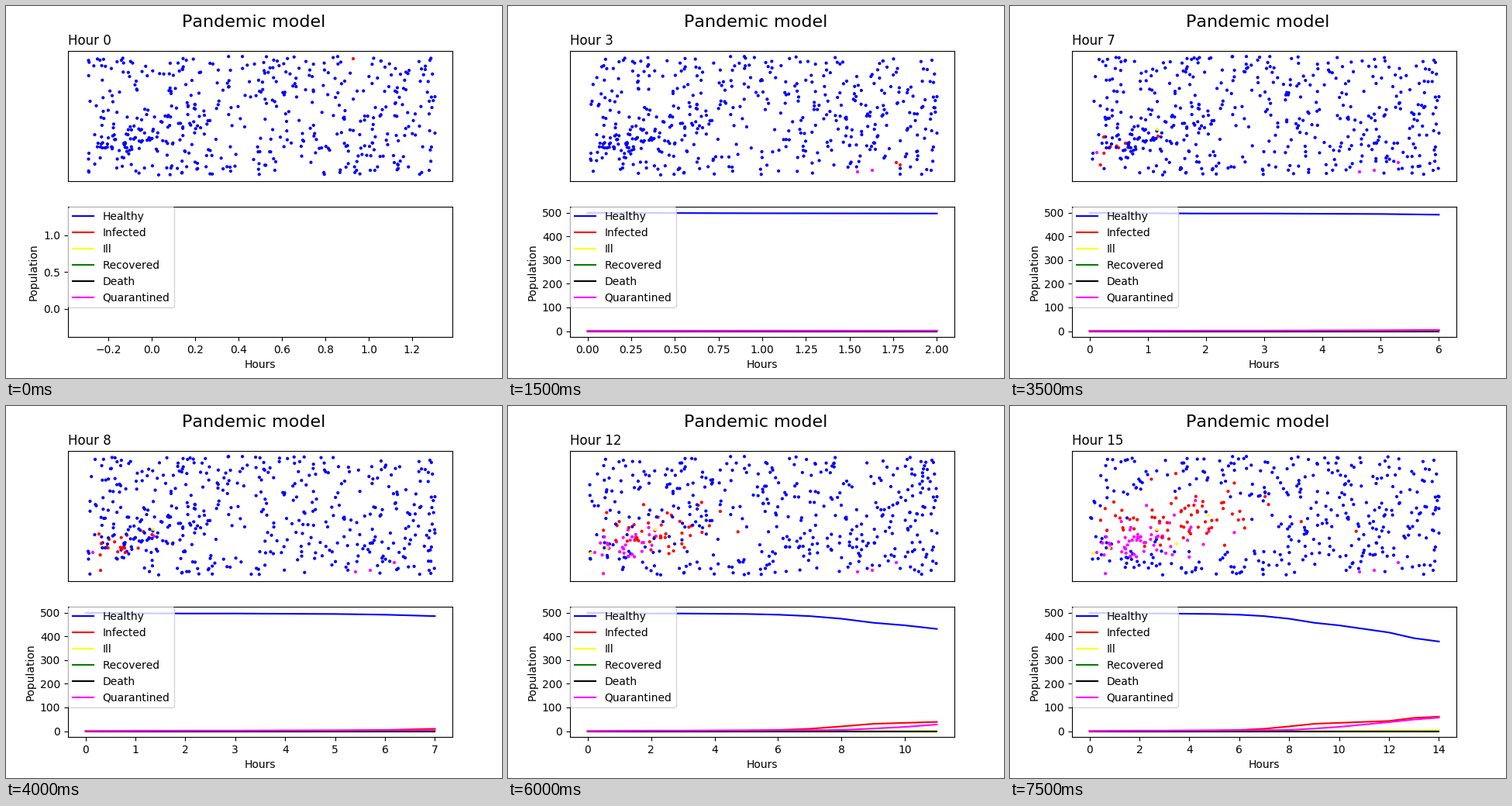
Recreate the animation shown at these times as a matplotlib script. Size 640 by 480 pixels, loop 8 s.

```python
import numpy as np
import matplotlib.pyplot as plt
from matplotlib.animation import FuncAnimation

plt.rcParams["text.kerning_factor"] = 6

HOURS = 16
PEOPLE = 500
LEFT, RIGHT, TOP, BOTTOM = 102.5, 553.5, 65.2, 217.9   # map extent in stage pixels


def course(*keys):
    """Whole number of people per hour, straight between (hour, count) keys."""
    hours, counts = zip(*keys)
    return np.floor(np.interp(np.arange(HOURS), hours, counts) + 1e-9).astype(int)


infected = course((0, 1), (1, 2), (4, 2), (6, 5), (7, 10), (9, 31), (12, 43), (13, 56), (15, 67))
quarantined = course((0, 0), (2, 2), (8, 5), (10, 18), (13, 49), (15, 66))
ill = course((6, 0), (7, 1), (10, 1), (12, 3), (15, 5))
nobody = np.zeros(HOURS, int)
healthy = PEOPLE - infected - quarantined - ill

SERIES = [
    ("Healthy", "blue", healthy),
    ("Infected", "red", infected),
    ("Ill", "yellow", ill),
    ("Recovered", "green", nobody),
    ("Death", "black", nobody),
    ("Quarantined", "magenta", quarantined),
]

FIRST_CASES = [(451, 214), (470, 212), (501, 202), (112, 189), (191, 168), (128, 183)]
TRIPS = {0: (1, (448, 68)), 3: (4, (506, 205)), 4: (7, (122, 182))}  # case: (arrival, start)
ILL_SITES = [(190, 159), (107, 190), (128, 183), (256, 141), (215, 178)]
RESIDENTS = [(305, TOP), (547, 70), (RIGHT, 117), (RIGHT, 164), (197, BOTTOM)]

rng = np.random.default_rng(12)


def outbreak(n):
    """Places of the sick in order of infection: a cloud drifting up and right, widening."""
    t = np.linspace(0, 1, n)
    x = rng.normal(118 + 130 * t ** 0.6, 10 + 65 * t)
    y = rng.normal(186 - 60 * t, 7 + 13 * t)
    return np.column_stack([LEFT + 3 + abs(x - LEFT - 3), y])


def spread_people(n):
    """Uniform places, thinned out around the outbreak."""
    p = rng.uniform((LEFT + 1, TOP), (RIGHT, BOTTOM), (3 * n + 20, 2))
    inside = (((p - (220, 148)) / (115, 40)) ** 2).sum(axis=1) < 1
    return p[~inside | (rng.random(len(p)) < 0.15)][:n]


def simulate():
    """Yield the places and colours of all people, hour by hour."""
    n_sick = infected[-1] + quarantined[-1]
    n_well = PEOPLE - n_sick - len(ILL_SITES)
    sick = np.vstack([FIRST_CASES, outbreak(n_sick - len(FIRST_CASES))])
    well = np.vstack([RESIDENTS, spread_people(n_well - len(RESIDENTS))])
    travels = rng.random(n_well) < 0.55
    travels[:len(RESIDENTS)] = False

    for h in range(HOURS):
        q, i = quarantined[h], infected[h]
        go = travels & (rng.random(n_well) < 0.5)
        well[go] = spread_people(go.sum())
        roaming = sick[max(q, len(FIRST_CASES)):q + i]
        roaming += rng.normal(0, 4, roaming.shape)

        now = sick.copy()
        for case, (arrival, start) in TRIPS.items():
            if h < arrival:
                now[case] = start
        colors = (["blue"] * n_well
                  + ["magenta"] * q + ["red"] * i + ["blue"] * (n_sick - q - i)
                  + ["yellow"] * ill[h] + ["blue"] * (len(ILL_SITES) - ill[h]))
        yield np.vstack([well, now, ILL_SITES]), colors


states = list(simulate())

fig, (world, chart) = plt.subplots(2, 1, figsize=(6.4, 4.8), dpi=100)
fig.suptitle("Pandemic model", fontsize=16, y=0.978)

world.set(xlim=(80, 576), ylim=(225.6, 57.6), xticks=[], yticks=[])
title = world.set_title("Hour 0", loc="left", pad=5.4)
dots = world.scatter(*states[0][0].T, s=4, c=states[0][1])

lines = [chart.plot([], [], color=color, label=name)[0] for name, color, _ in SERIES]
chart.set(xlabel="Hours", ylabel="Population")
chart.legend(loc="upper left", borderaxespad=0)


def update(h):
    places, colors = states[h]
    title.set_text(f"Hour {h}")
    dots.set_offsets(places)
    dots.set_facecolors(colors)
    for line, (_, _, counts) in zip(lines, SERIES):
        line.set_data(np.arange(h), counts[:h])
    if h == 0:
        chart.set(xlim=(-0.386, 1.386), ylim=(-0.386, 1.386))
    else:
        chart.relim()
        chart.autoscale()
    return [title, dots, *lines]


anim = FuncAnimation(fig, update, frames=HOURS, interval=500, repeat=True,
                     repeat_delay=0, init_func=lambda: update(0), blit=False)
plt.show()
```
